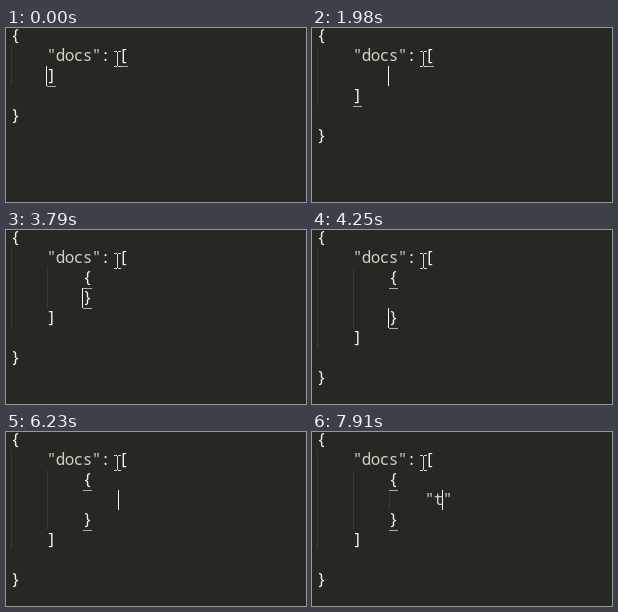
An HTML page with a canvas that plays this animation: 300 by 174 pixels, repeating every 8 s.

```html
<!DOCTYPE html>
<html lang="en">
<head>
<meta charset="utf-8">
<title>Typing JSON</title>
<style>
  html, body { margin: 0; width: 100%; height: 100%; overflow: hidden; background: #272822; }
  canvas { display: block; width: 300px; height: 174px; }
</style>
</head>
<body>
<canvas id="stage" width="300" height="174"></canvas>
<script>
const ctx = document.getElementById('stage').getContext('2d');
const LOOP = 8000, CELL = 9, LINE = 20, LEFT = 4, TOP = -2;
const COLORS = {
  back: '#272822', text: '#f8f8f2', string: '#cfcfc2',
  guide: '#48483e', bracket: 'rgba(248,248,242,0.65)', mouse: '#d8d7dd'
};

const doc = (...inner) => ['{', '    "docs": [', ...inner, '    ]', '', '}'];
const inner = text => ' '.repeat(8) + text;
const field = text => doc(inner('{'), inner('    ' + text), inner('}'));

const start = doc(), gap = doc(''), pair = doc(inner('{}')), spaced = doc(inner('{ }'));
const split = doc(inner('{'), inner('}')), open = field('').map(s => s.trimEnd());
const quotes = field('""'), letter = field('"t"');

// time, document, caret line, caret column, caret opacity
const steps = [
  [0, start, 2, 4, 1],
  [300, gap, 3, 4, 0.5],
  [450, gap, 3, 4, 1],
  [910, gap, 2, 0, 1],
  [1370, gap, 2, 4, 1],
  [1830, gap, 2, 8, 0.5],
  [1980, gap, 2, 8, 1],
  [2280, pair, 2, 9, 0.5],
  [2430, pair, 2, 9, 1],
  [2730, pair, 2, 9, 0.5],
  [2880, pair, 2, 9, 0],
  [3340, pair, 2, 9, 0.5],
  [3490, spaced, 2, 10, 1],
  [3640, split, 3, 8, 0.5],
  [3790, split, 3, 8, 1],
  [4100, open, 4, 8, 0.5],
  [4250, open, 4, 8, 1],
  [4710, open, 3, 0, 1],
  [5020, open, 3, 12, 0.5],
  [5170, open, 3, 12, 1],
  [5470, open, 3, 12, 0.5],
  [5620, open, 3, 12, 0],
  [6080, open, 3, 12, 0.5],
  [6230, open, 3, 12, 1],
  [6540, quotes, 3, 14, 1],
  [6840, quotes, 3, 13, 0.5],
  [6990, quotes, 3, 13, 1],
  [7450, quotes, 3, 13, 0.5],
  [7600, quotes, 3, 13, 0],
  [7910, letter, 3, 14, 1]
];

const xOf = col => LEFT + col * CELL;
const yOf = row => TOP + row * LINE;

function rect(x, y, w, h, color) {
  ctx.fillStyle = color;
  ctx.fillRect(x, y, w, h);
}

function indentLevel(lines, row) {
  const line = lines[row];
  if (line) return line.search(/\S/) / 4;
  return Math.min(indentLevel(lines, row - 1), indentLevel(lines, row + 1));
}

function drawGuides(lines, row) {
  for (let level = 0; level < indentLevel(lines, row); level++) {
    for (let y = 0; y < LINE; y += 2) {
      rect(xOf(level * 4) + 1, yOf(row) + y, 1, 1, COLORS.guide);
    }
  }
}

function drawLine(line, row, brackets) {
  let quoted = false;
  [...line].forEach((char, col) => {
    const isString = quoted || char === '"';
    if (char === '"') quoted = !quoted;
    ctx.fillStyle = isString ? COLORS.string : COLORS.text;
    ctx.fillText(char, xOf(col) + 5.5, yOf(row) + 15);
    if (col > 0 && brackets.includes(char)) {
      rect(xOf(col) + 1, yOf(row) + LINE, CELL, 1, COLORS.bracket);
    }
  });
}

function drawMouse() {
  rect(111, 24, 1, 14, COLORS.mouse);
  for (const y of [23, 38]) {
    rect(108, y, 3, 1, COLORS.mouse);
    rect(112, y, 3, 1, COLORS.mouse);
  }
}

function draw(time) {
  const [, lines, row, col, alpha] = steps.findLast(step => step[0] <= time);
  const brackets = lines.some(line => line.indexOf('{') > 0) ? '{}' : '[]';
  rect(0, 0, 300, 174, COLORS.back);
  ctx.font = '16px "Noto Sans Mono", monospace';
  ctx.textAlign = 'center';
  ctx.textBaseline = 'alphabetic';
  lines.forEach((line, i) => drawGuides(lines, i));
  lines.forEach((line, i) => drawLine(line, i, brackets));
  ctx.globalAlpha = alpha;
  rect(xOf(col), yOf(row), 1, LINE, COLORS.text);
  ctx.globalAlpha = 1;
  drawMouse();
}

const began = performance.now();
function tick() {
  draw((performance.now() - began) % LOOP);
  requestAnimationFrame(tick);
}
tick();
</script>
</body>
</html>
```
